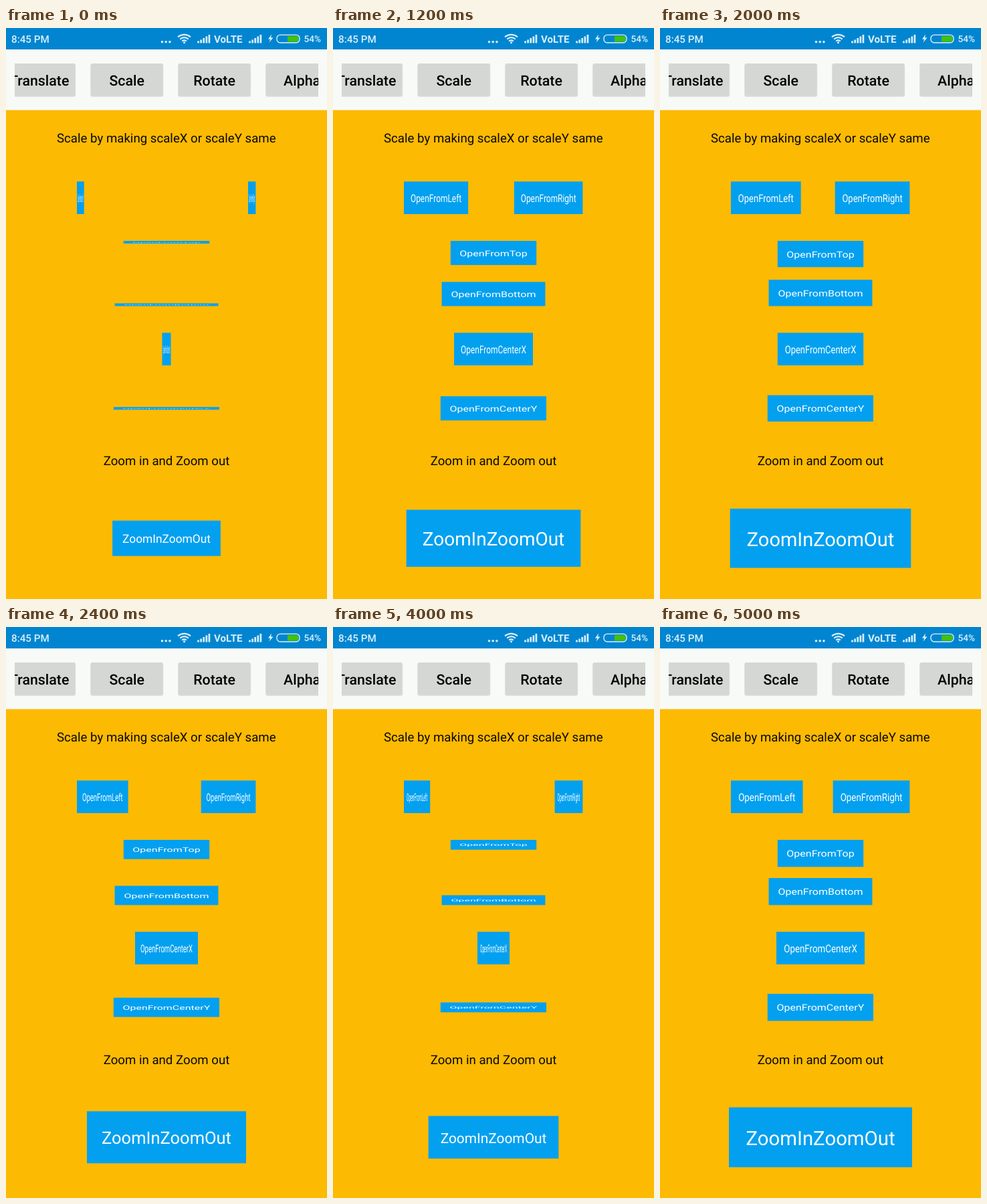
Recreate the animation shown at these times as an HTML page. Size 480 px wide and 853 px high, loop 5100 ms.

```html
<!DOCTYPE html>
<html lang="en">
<head>
<meta charset="utf-8">
<title>Scale animations</title>
<style>
  @property --s { syntax: "<number>"; inherits: true; initial-value: 0; }

  html, body { margin: 0; width: 100%; height: 100%; overflow: hidden; background: #fdba03; }
  svg { display: block; }
  text { font-family: Roboto, sans-serif; text-rendering: geometricPrecision; }

  /* One value, sampled ten times a second, drives every box. */
  .stage { animation: swing 5100ms -8ms infinite; }
  @keyframes swing {
    0%       { --s: .083; animation-timing-function: steps(8); }
    15.6863% { --s: .523; animation-timing-function: steps(8); }
    31.3725% { --s: .968; animation-timing-function: steps(1); }
    33.3333% { --s: .975; animation-timing-function: steps(7); }
    47.0588% { --s: .594; animation-timing-function: steps(8); }
    62.7451% { --s: .147; animation-timing-function: steps(2); }
    66.6667% { --s: .036; animation-timing-function: steps(1); }
    68.6275% { --s: .021; animation-timing-function: steps(5); }
    78.4314% { --s: .304; animation-timing-function: steps(8); }
    94.1176% { --s: .746; animation-timing-function: steps(2); }
    98.0392%, 100% { --s: .834; }
  }

  .box { transform-box: fill-box; transform-origin: center; font-size: 16px; text-anchor: middle; }
  .box rect { fill: #03a0f0; }
  .box text { fill: #fff; }
  .x { transform: scaleX(var(--s)); }
  .y { transform: scaleY(var(--s)); }
  .zoom { transform: scale(calc(1 + var(--s))); }
  .left { transform-origin: left; }
  .right { transform-origin: right; }
  .top { transform-origin: top; }
  .bottom { transform-origin: bottom; }

  .label { font-size: 18.67px; text-anchor: middle; fill: #0a0800; }
  .tabs { font-size: 21.33px; font-weight: 500; text-anchor: middle; }
  .status { fill: #d9f0fb; font-weight: 500; }
  .line { fill: none; stroke: #d9f0fb; }
</style>
</head>
<body>
<svg class="stage" width="480" height="853" viewBox="0 0 480 853">
  <defs>
    <clipPath id="strip"><rect x="13" y="32" width="454" height="90"/></clipPath>
    <path id="bars" class="line" stroke-width="2.7" d="M1.5 0v-3M5.6 0v-5M9.7 0v-7.5M13.8 0v-10M17.9 0v-12.5"/>
    <g id="tab">
      <rect x="-54.6" y="53" width="109.2" height="50" rx="3.5" fill="#000" opacity=".1"/>
      <rect x="-53.8" y="53" width="107.6" height="48.5" rx="2.5" fill="#d5d7d4"/>
    </g>
  </defs>

  <rect width="480" height="853" fill="#fdba03"/>
  <rect y="32" width="480" height="90.67" fill="#f8faf8"/>
  <rect width="480" height="32" fill="#0285d0"/>

  <g class="status">
    <text x="8" y="22" font-size="15.2">8:45 PM</text>
    <circle cx="233.5" cy="20.7" r="1.8"/>
    <circle cx="239.2" cy="20.7" r="1.8"/>
    <circle cx="244.9" cy="20.7" r="1.8"/>
    <path class="line" stroke-width="2.2" d="M257 13.4q9.5-7 19 0M260.2 16.6q6.3-4.8 12.6 0M263.2 19.6q3.3-2.4 6.6 0"/>
    <circle cx="266.5" cy="21.7" r="1.5"/>
    <use href="#bars" x="286" y="22.5"/>
    <text x="311" y="22" font-size="15.1" font-weight="700">VoLTE</text>
    <use href="#bars" x="363" y="22.5"/>
    <path d="M397 9.5l-5 7.2h3.2l-1.7 5 6-7.2h-3.4z"/>
    <rect class="line" x="405" y="10.4" width="34" height="11.6" rx="5" stroke-width="1.4"/>
    <path d="M421 12h13.5a3 3 0 0 1 3 3v2.4a3 3 0 0 1-3 3H421z" fill="#43c10c"/>
    <text x="445.5" y="21.2" font-size="13.6">54%</text>
  </g>

  <g class="tabs" clip-path="url(#strip)">
    <use href="#tab" x="49.7"/>
    <use href="#tab" x="180.7"/>
    <use href="#tab" x="311.6"/>
    <use href="#tab" x="442.6"/>
    <text x="49.7" y="85.5">Translate</text>
    <text x="180.7" y="85.5">Scale</text>
    <text x="311.6" y="85.5">Rotate</text>
    <text x="442.6" y="85.5">Alpha</text>
  </g>

  <text class="label" x="239.8" y="170.67">Scale by making scaleX or scaleY same</text>
  <text class="label" x="240" y="652.67">Zoom in and Zoom out</text>

  <g class="box x left">
    <rect x="106" y="229.33" width="129" height="48.67"/>
    <text x="170.5" y="259.8">OpenFromLeft</text>
  </g>
  <g class="box x right">
    <rect x="235.8" y="229.33" width="137.6" height="48.67"/>
    <text x="304.6" y="259.8">OpenFromRight</text>
  </g>
  <g class="box y top">
    <rect x="175.8" y="318" width="128.4" height="48.4"/>
    <text x="240" y="348.4">OpenFromTop</text>
  </g>
  <g class="box y bottom">
    <rect x="162.6" y="367" width="154.8" height="48.4"/>
    <text x="240" y="397.4">OpenFromBottom</text>
  </g>
  <g class="box x">
    <rect x="160.9" y="455.33" width="158.2" height="48.67"/>
    <text x="240" y="485.8">OpenFromCenterX</text>
  </g>
  <g class="box y">
    <rect x="160.8" y="544" width="158.2" height="48.4"/>
    <text x="239.9" y="574.4">OpenFromCenterY</text>
  </g>
  <g class="box zoom">
    <rect x="165.33" y="737.9" width="149.33" height="48.8"/>
    <text x="240" y="768.6">ZoomInZoomOut</text>
  </g>
</svg>
</body>
</html>
```
